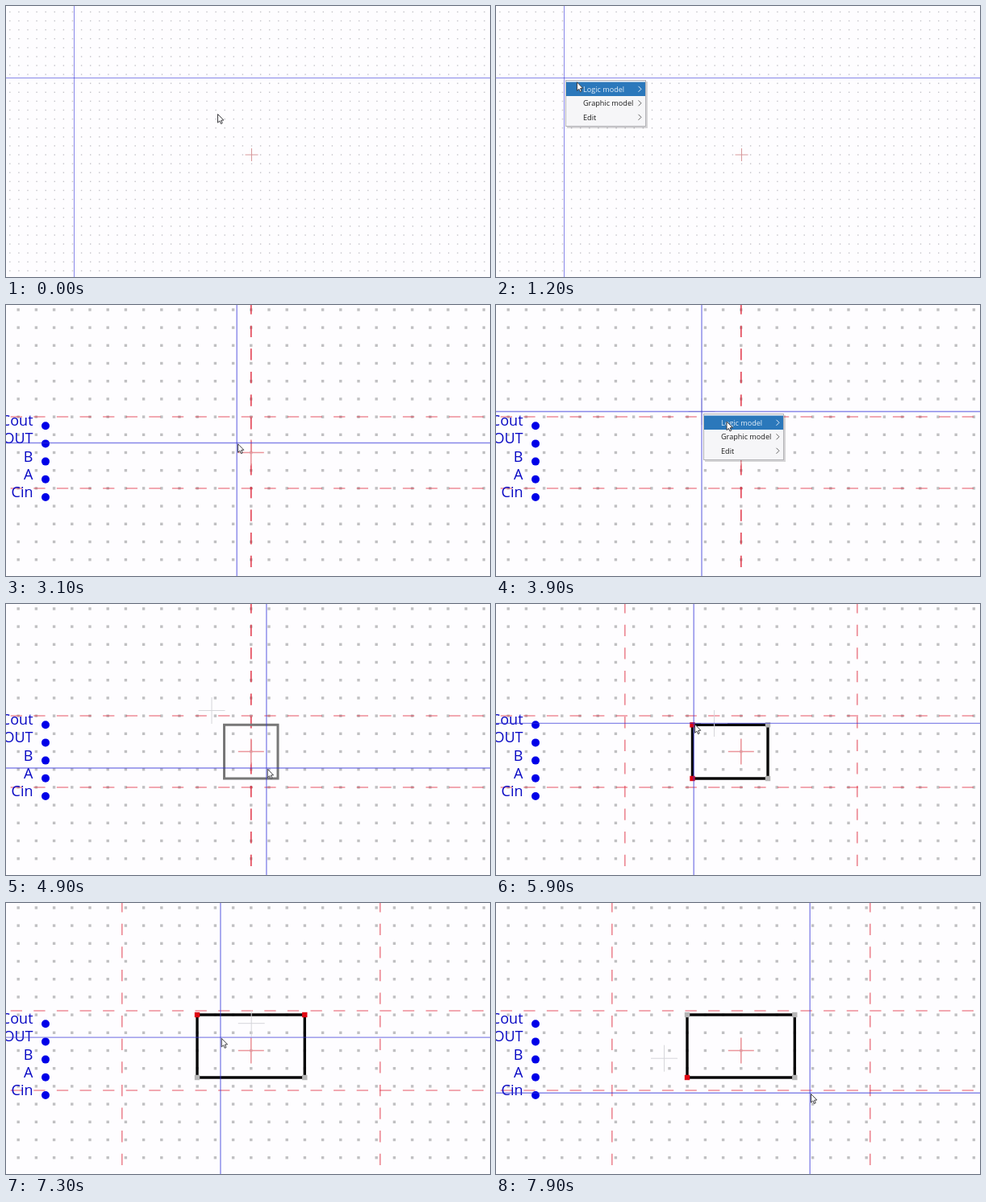
Animation of 600 by 337 pixels, one loop 8 s. Source, as an HTML page with a canvas:

```html
<!DOCTYPE html>
<html lang="en">
<head>
<meta charset="utf-8">
<title>Symbol editor</title>
<style>
html, body { margin: 0; width: 100%; height: 100%; overflow: hidden; background: #fefdff; }
canvas { display: block; }
</style>
</head>
<body>
<canvas id="stage" width="600" height="337"></canvas>
<script>
const W = 600, H = 337, LOOP = 8000, STEP = 100;
const g = document.getElementById('stage').getContext('2d');

const CX = 303.8, CY = 183.5, GAP = 22.2;
const OPEN_EDITOR = 2600, ADD_SHAPE = 4500;
const DRAG_LEFT = 5400, DRAG_RIGHT = 6400, DRAG_TOP = 7100, DESELECT = 7600;
const TIP = 1.3; // pointer tip to crosshair

// time, x, y of the pointer tip, 1 for a click
const path = [
  [500, 262.5, 134.5], [1100, 84.5, 89.5], [1700, 180, 121], [2300, 326.5, 221.5],
  [OPEN_EDITOR, 326.5, 221.5], [3500, 256.3, 133.8, 1], [3900, 286, 145],
  [4300, 320, 164], [4900, 324.2, 205.3], [DRAG_LEFT, 271.8, 149.8, 1],
  [5900, 246.5, 149.7], [DRAG_RIGHT, 337.3, 216.3, 1], [6770, 371.5, 222],
  [DRAG_TOP, 305.5, 151, 1], [DESELECT, 209.8, 194.5, 1], [7900, 390.5, 237.5]
];
const ports = ['Cout', 'OUT', 'B', 'A', 'Cin'];
const items = ['Logic model', 'Graphic model', 'Edit'];

const ramp = (t, from, to) => Math.min(1, Math.max(0, (t - from) / (to - from)));
const within = (t, from, to) => t >= from && t < to;

function pointerAt(t) {
  const i = Math.max(1, path.findIndex(p => p[0] > t));
  const end = path[path.length - 1];
  if (t >= end[0]) return [end[1], end[2]];
  const a = path[i - 1], b = path[i], k = ramp(t, a[0], b[0]);
  return [a[1] + (b[1] - a[1]) * k, a[2] + (b[2] - a[2]) * k];
}

function line(x1, y1, x2, y2, color, width = 1, dash = []) {
  g.strokeStyle = color;
  g.lineWidth = width;
  g.setLineDash(dash);
  g.beginPath();
  g.moveTo(x1, y1);
  g.lineTo(x2, y2);
  g.stroke();
  g.setLineDash([]);
}

function outline(pts, color, width, fill) {
  g.beginPath();
  pts.forEach(p => g.lineTo(...p));
  g.closePath();
  if (fill) {
    g.fillStyle = fill;
    g.fill();
  }
  g.strokeStyle = color;
  g.lineWidth = width;
  g.stroke();
}

function cross(x, y, r, color, width) {
  line(x - r, y, x + r, y, color, width);
  line(x, y - r, x, y + r, color, width);
}

function square(x, y, size, color) {
  g.fillStyle = color;
  g.fillRect(x - size / 2, y - size / 2, size, size);
}

function grid(cx, cy, gap, size, color) {
  for (let x = cx % gap; x < W; x += gap)
    for (let y = cy % gap; y < H; y += gap) square(x, y, size, color);
}

function crosshair(x, y, width) {
  const color = 'rgba(50,50,215,.58)';
  line(x, 0, x, H, color, width);
  line(0, y, W, y, color, width);
}

function bounds(dx, dy) {
  const color = 'rgba(222,28,48,.5)', dash = [14.3, 14.3];
  for (const s of [-1, 1]) {
    const x = CX + s * dx, y = CY + s * dy;
    line(x, 326, x, -20, color, 1.7, dash);
    line(592, y, -20, y, color, 1.5, dash);
  }
}

function drawPorts() {
  g.font = '18px "Open Sans", "Noto Sans", sans-serif';
  g.textAlign = 'right';
  ports.forEach((name, i) => {
    const y = 150.2 + i * GAP;
    g.fillStyle = '#0808c4';
    g.fillText(name, 33.5, y);
    g.fillStyle = '#0000e8';
    g.beginPath();
    g.arc(49, y, 5, 0, 7);
    g.fill();
  });
}

function drawShape(t) {
  const pull = ramp(t, DRAG_RIGHT, DRAG_RIGHT + 370);
  const left = 270.5 - 33.5 * ramp(t, DRAG_LEFT, DRAG_LEFT + 620);
  const right = 337 + 33.3 * pull;
  const drop = 5.3 * Math.sin(Math.PI * pull);
  const top = 150.3 - 11.3 * ramp(t, DRAG_TOP, DRAG_TOP + 200);
  const pts = [[left, top], [right, top + drop], [right, 217 + drop], [left, 217]];
  if (t < DRAG_LEFT) return outline(pts, '#777', 3);

  outline(pts, '#080808', 3.4);
  const hot = t < DRAG_RIGHT ? [0, 3] : t < DRAG_TOP ? [1, 2] : t < DESELECT ? [0, 1] : [3];
  pts.forEach(([x, y], i) => square(x, y, 6.4, hot.includes(i) ? '#e00814' : '#b6b6b6'));
}

function menu(x, y, [px, py]) {
  const row = px < x + 100 ? Math.floor((py - y - 2) / 17.5) : 1;
  g.fillStyle = 'rgba(0,0,0,.16)';
  g.fillRect(x + 2, y + 2, 100, 58);
  g.fillStyle = '#f6f6f8';
  g.fillRect(x, y, 100, 58);
  g.strokeStyle = '#b4b4b8';
  g.lineWidth = 1;
  g.strokeRect(x + .5, y + .5, 99, 57);
  g.font = '9.1px "Open Sans", "Noto Sans", sans-serif';
  g.textAlign = 'left';
  items.forEach((name, i) => {
    const mid = y + 11.3 + i * 17.5, on = i === row;
    if (on) {
      g.fillStyle = '#2b78bb';
      g.fillRect(x + 1, mid - 8.8, 98, 17.5);
    }
    g.fillStyle = on ? '#e4eef8' : '#1c1c1c';
    g.fillText(name, x + 22, mid + 3.3);
    const ink = on ? '#e4eef8' : '#666';
    line(x + 90.5, mid - 3.5, x + 94, mid, ink);
    line(x + 94, mid, x + 90.5, mid + 3.5, ink);
  });
}

function arrow(x, y) {
  const pts = [[0, 0], [0, 10.6], [2.4, 8.4], [4, 12], [5.7, 11.2], [4.2, 7.7], [7.3, 7.5]];
  outline(pts.map(([a, b]) => [x + a, y + b]), '#3c3c40', 1, '#fff');
}

function sheet(t, tip) {
  grid(304.5, 185, GAP / 2, 1.4, '#c3c2c8');
  cross(304.5, 185, 8, '#d89a9c', 1);
  crosshair(84.5, 89.5, 1);
  if (within(t, 1200, 2200)) menu(86, 92, tip);
}

function editor(t, tip) {
  grid(CX, CY, GAP, 3.4, '#c0c0c2');
  const half = t < DRAG_LEFT ? 0 : t < DRAG_TOP + 200 ? 144 : 160;
  bounds(half, half > 144 ? 49.5 : 44.5);
  drawPorts();
  cross(CX, CY, 16, '#ea959b', 1.6);
  if (t >= ADD_SHAPE) drawShape(t);

  const last = path.filter(p => p[3] && p[0] <= t).pop();
  if (last) cross(last[1] - TIP, last[2] - TIP, 16.5, '#d6d6da', 1);
  const open = within(t, 3500, 4300);
  const [x, y] = open ? last.slice(1) : tip;
  crosshair(x - TIP, y - TIP, 1.4);
  if (open) menu(257, 135, tip);
}

function draw(t) {
  g.fillStyle = '#fefdff';
  g.fillRect(0, 0, W, H);
  const tip = pointerAt(t);
  (t < OPEN_EDITOR ? sheet : editor)(t, tip);
  arrow(...tip);
}

const start = performance.now();
function tick() {
  const t = (performance.now() - start) % LOOP;
  draw(Math.floor(t / STEP) * STEP);
  requestAnimationFrame(tick);
}
tick();
</script>
</body>
</html>
```
